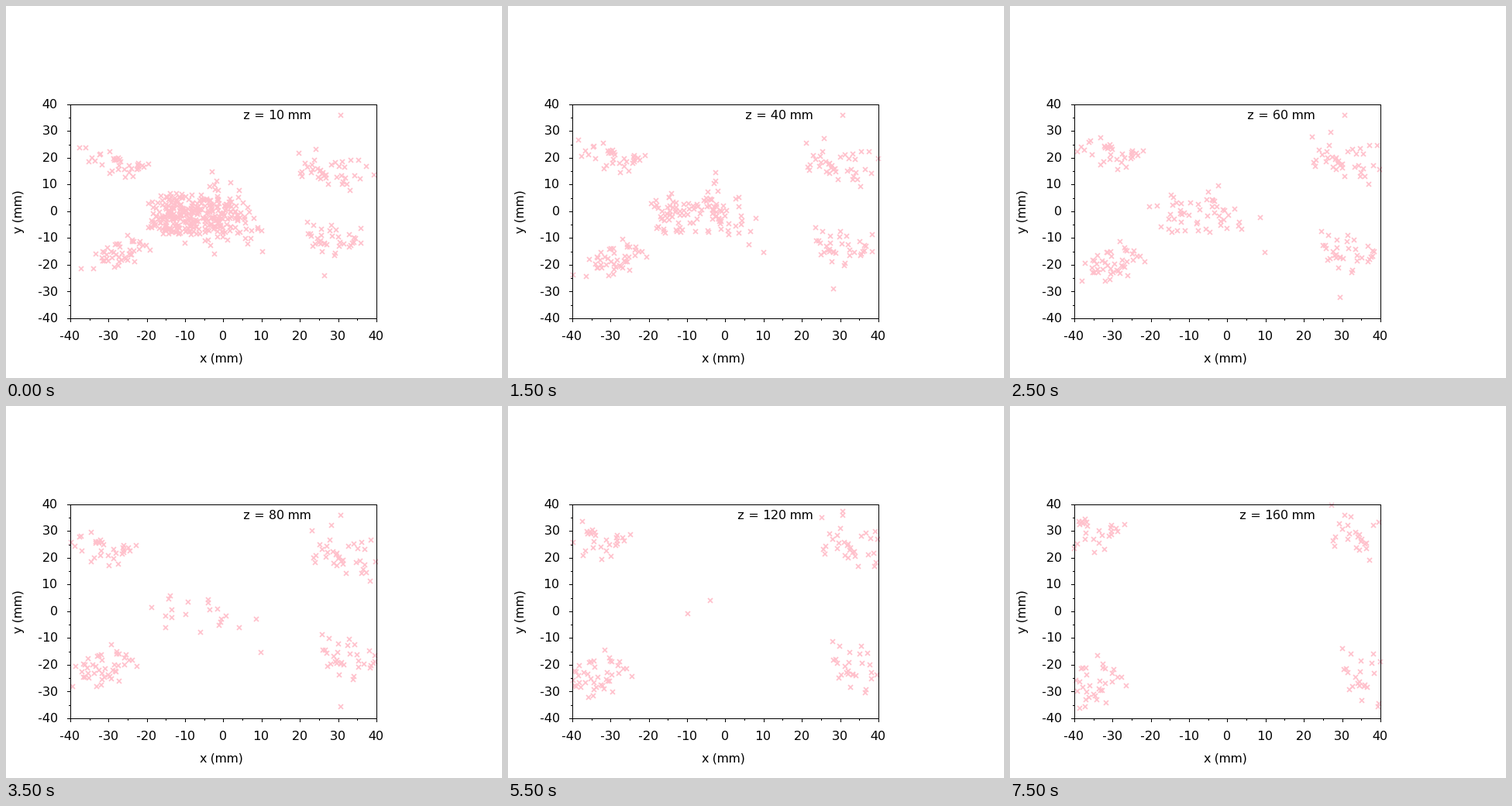
Animation, 640 px wide and 480 px high, one loop 8 s. Source, as a matplotlib script:

```python
import numpy as np
import matplotlib.pyplot as plt
from matplotlib.animation import FuncAnimation

W, H, DPI = 640, 480, 100
PX = 72 / DPI  # points per pixel
LEFT, RIGHT, TOP, BOTTOM = 82.9, 477.9, 126.9, 402.9
PINK = "#ffc0cb"
FRAMES, Z_STEP = 16, 10

plt.rcParams["font.family"] = "DejaVu Sans"
plt.rcParams["text.hinting_factor"] = 1  # whole-pixel glyph advances
rng = np.random.default_rng(11)


def to_px(x, y):
    return (LEFT + (x + 40) * (RIGHT - LEFT) / 80,
            BOTTOM - (y + 40) * (BOTTOM - TOP) / 80)


def beam(signs, n, x_range, y_mid, tilt, spread, vy):
    """Start positions and drift per mm of z; outer particles drift faster."""
    x = rng.triangular(*x_range, n)
    dy = rng.normal(0, spread, n)
    y = y_mid + tilt * (x - 25) + dy
    drift = np.column_stack([.06 + .002 * (x - 25), vy + .005 * dy])
    return np.column_stack([x, y]) * signs, drift * signs


def cloud(n_core, n_side):
    """Trapped particles: a dense core and a thin tail to the right."""
    x = np.append(rng.triangular(-20, -14, 6, n_core),
                  rng.uniform(-5, 10.5, n_side))
    y = np.append(rng.uniform(-8.5, 5.5, n_core) + rng.normal(0, 1.2, n_core),
                  rng.normal(-.5, 6, n_side))
    return np.column_stack([x, y])


beams = [beam((-1, 1), 34, (17, 26, 40), 17, .35, 2.6, .085),
         beam((1, 1), 40, (18, 26, 40), 14.8, 0, 3.3, .085),
         beam((-1, -1), 45, (17, 24, 40), 15, .45, 2.6, .08),
         beam((1, -1), 37, (21, 23, 39), 11, 0, 3.6, .1)]
start = np.vstack([b[0] for b in beams])
drift = np.vstack([b[1] for b in beams])

centre = cloud(265, 65)
n = len(centre)
life = np.minimum(10 + rng.exponential(28, n), 130)
radius = rng.uniform(.2, 1, n)
phase = rng.uniform(0, 2 * np.pi, n)
omega = rng.uniform(.1, .5, n)


def particles(z):
    a = omega * z + phase
    orbit = centre + radius[:, None] * np.column_stack([np.cos(a), np.sin(a)])
    p = np.vstack([start + drift * (z - Z_STEP), orbit[life >= z]])
    return p[(np.abs(p) <= 40).all(axis=1)]


fig = plt.figure(figsize=(W / DPI, H / DPI), dpi=DPI, facecolor="white")
ax = fig.add_axes([0, 0, 1, 1])
ax.set_xlim(0, W)
ax.set_ylim(H, 0)
ax.axis("off")


def line(xs, ys):
    ax.plot(xs, ys, color="black", lw=PX, antialiased=False, zorder=3)


def label(x, y, s, ha="center", va="baseline", **kw):
    return ax.text(x, y, s, fontsize=16 * PX, color="black",
                   ha=ha, va=va, **kw)


line([LEFT, RIGHT, RIGHT, LEFT, LEFT], [TOP, TOP, BOTTOM, BOTTOM, TOP])
for v in range(-40, 41, 5):
    x, y = to_px(v, v)
    size = 2 if v % 10 else 4
    line([x, x], [BOTTOM, BOTTOM + size])
    line([LEFT - size, LEFT], [y, y])
    if v % 10 == 0:
        label(x - .4, 431, str(v))
        label(66.5, y + 5.1, str(v), ha="right")
label(278, 459, "x (mm)")
label(16, 265, "y (mm)", va="center", rotation=90)

mark = dict(ls="none", marker="x", ms=6 * PX, mew=1.7 * PX, color=PINK,
            zorder=2)
ax.plot([432], [141], **mark)
dots, = ax.plot([], [], **mark)
title = label(394.5, 146, "", ha="right")


def draw(i):
    z = Z_STEP * (i + 1)
    p = particles(z)
    dots.set_data(*to_px(p[:, 0], p[:, 1]))
    title.set_text(f"z = {z} mm")
    return dots, title


anim = FuncAnimation(fig, draw, frames=FRAMES, interval=500, repeat=True,
                     repeat_delay=0, blit=False)
plt.show()
```
